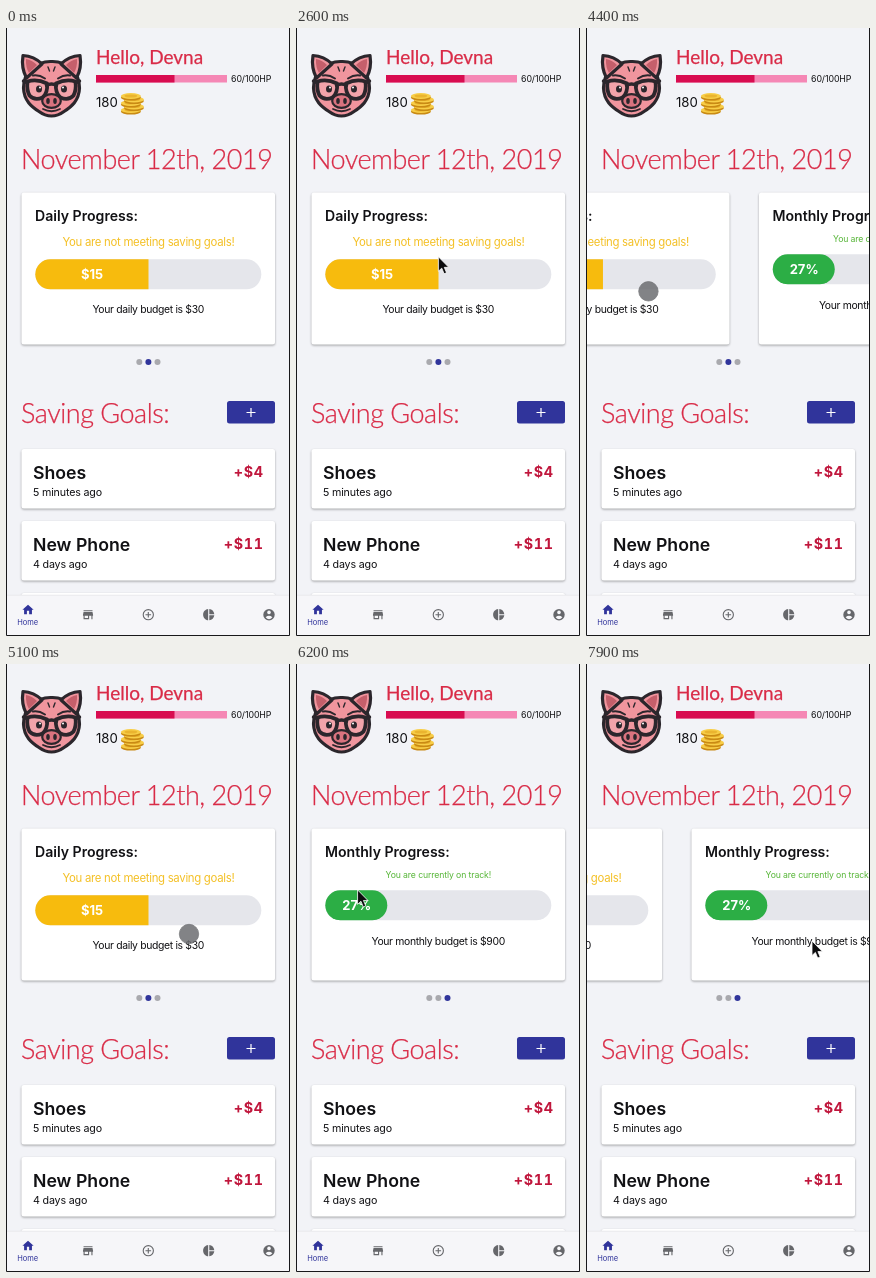
Write an HTML page that moves like this. It is 284 px wide and 608 px high and loops after 8000 ms.

```html
<!DOCTYPE html>
<html lang="en">
<head>
<meta charset="utf-8">
<title>Savings dashboard</title>
<style>
  html, body { margin: 0; width: 100%; height: 100%; overflow: hidden; background: #f2f3f7; }
  svg { display: block; width: 100%; height: 100%; }
  text { font-family: Inter, Roboto, sans-serif; fill: #111114; white-space: pre; }
  .lato { font-family: Lato, sans-serif; fill: #d92b47; stroke: #d92b47; stroke-width: .25px; }
  .light { font-size: 27px; font-weight: 300; letter-spacing: -.47px; }
  .head { font-size: 14.1px; font-weight: 600; }
  .mid { text-anchor: middle; }
  .body { font-size: 10.4px; letter-spacing: -.34px; }
  .bar { font-size: 13px; font-weight: 700; fill: #fff; }
  .goal { font-size: 17.7px; font-weight: 600; }
  .ago { font-size: 10.7px; letter-spacing: -.17px; }
  .gain { font-size: 14.3px; font-weight: 700; letter-spacing: .7px; text-anchor: end; fill: #c0163c; font-feature-settings: "tnum"; }
  .card { fill: #fff; filter: drop-shadow(0 1px 1px rgba(0, 0, 0, .34)); }
  .ink { fill: none; stroke: #2b262c; stroke-linecap: round; stroke-linejoin: round; }
  .dark { fill: #2b262c; }
  .skin { fill: #f0959e; }
  .icon { fill: #66676b; }
</style>
</head>
<body>
<svg viewBox="0 0 284 608" preserveAspectRatio="none">
  <defs>
    <clipPath id="view"><rect x="1" y="155" width="282" height="170"/></clipPath>
    <g id="ear">
      <path class="ink skin" d="M17 27.5Q15 40 20.5 50L36 36Q28 28 17 27.5Z" stroke-width="3.2"/>
      <path d="M20 31Q19.5 39 23 45L31 37Q26 32 20 31Z" fill="#c55f6b"/>
    </g>
    <g id="half">
      <path class="ink" d="M21.5 53.5Q31 50.5 41 55.5Q42 65 36.5 69.5Q28.5 73 23.5 67.5Q20.5 62 21.5 53.5Z" style="fill:#f2a3aa" stroke-width="3.8"/>
      <path class="ink" d="M21.5 55L17.5 53" stroke-width="3.4"/>
      <ellipse class="dark" cx="33" cy="61" rx="3" ry="3.5"/>
      <circle cx="34" cy="59.6" r="1" fill="#fff"/>
      <path class="ink" d="M27 47.5Q33 46.5 39 50.5" stroke-width="2"/>
    </g>
  </defs>
  <rect width="284" height="608" fill="#f2f3f7"/>

  <g id="pig">
    <path class="ink skin" d="M45.5 33.5C30 33 17.5 44 17.5 60C18 73 26 79 33 83.5Q39 88 45.5 88T58 83.5C65 79 73 73 73.5 60C73.5 44 61 33 45.5 33.5Z" stroke-width="3.2"/>
    <use href="#ear"/><use href="#ear" transform="matrix(-1 0 0 1 91 0)"/>
    <path class="ink" d="M42 39L43.5 43M49 39L47.5 43" stroke-width="1.4"/>
    <use href="#half"/><use href="#half" transform="matrix(-1 0 0 1 91 0)"/>
    <path class="ink" d="M40.5 57.5Q45.5 54.5 50.5 57.5" stroke-width="3.4"/>
    <ellipse class="ink" cx="45.5" cy="73" rx="9.3" ry="6.8" style="fill:#d9737f" stroke-width="2.2"/>
    <ellipse class="dark" cx="42" cy="73" rx="1.8" ry="3"/>
    <ellipse class="dark" cx="49" cy="73" rx="1.8" ry="3"/>
    <path class="ink" d="M37 81Q45.5 85.5 54 81" stroke-width="1.8"/>
  </g>

  <text class="lato" x="90" y="36" font-size="19">Hello, Devna</text>
  <rect x="90" y="47" width="131" height="7.5" fill="#f587b5"/>
  <rect x="90" y="47" width="78.5" height="7.5" fill="#d80c50"/>
  <text x="225" y="54" font-size="8.8" letter-spacing="-.08">60/100HP</text>
  <text x="90" y="79" font-size="13.2">180</text>
  <g id="coins"></g>

  <text class="lato light" x="15" y="140.5">November 12th, 2019</text>

  <g clip-path="url(#view)"><g id="track">
    <g>
      <rect class="card" x="15.5" y="164.5" width="253.5" height="152" rx="2.5"/>
      <text class="head" x="29" y="193">Daily Progress:</text>
      <text class="mid" x="142.5" y="217.5" font-size="11.4" letter-spacing="-.3" style="fill:#f4c026">You are not meeting saving goals!</text>
      <rect x="29.3" y="231.3" width="226" height="30" rx="15" fill="#e5e6eb"/>
      <path d="M142.5 231.3H44.3a15 15 0 0 0 0 30H142.5Z" fill="#f7bb0d"/>
      <text class="bar mid" x="86" y="250.7">$15</text>
      <text class="body mid" x="142.2" y="285">Your daily budget is $30</text>
    </g>
    <g transform="translate(283)">
      <rect class="card" x="15.5" y="164.5" width="253.5" height="152" rx="2.5"/>
      <text class="head" x="29" y="193">Monthly Progress:</text>
      <text class="mid" x="142.3" y="213.5" font-size="8.7" letter-spacing="-.12" style="fill:#55b536">You are currently on track!</text>
      <rect x="29.3" y="226.3" width="226" height="30" rx="15" fill="#e5e6eb"/>
      <rect x="29.3" y="226.3" width="62" height="30" rx="15" fill="#2cae45"/>
      <text class="bar mid" x="60.7" y="245.7">27%</text>
      <text class="body mid" x="142.2" y="280.5">Your monthly budget is $900</text>
    </g>
  </g></g>
  <g id="dots"></g>

  <text class="lato light" x="15" y="394.5">Saving Goals:</text>
  <rect x="221" y="373" width="48" height="22.5" rx="2.5" fill="#30349b"/>
  <path d="M240.5 384.5h9M245 380v9" stroke="#fff" stroke-width="1.2"/>
  <g id="goals"></g>

  <rect y="567" width="284" height="41" fill="#f6f6f9"/>
  <path d="M0 567.2H284" stroke="#e6e6ea" stroke-width=".8"/>
  <g transform="translate(15.3 575) scale(.56)"><path d="M10 20v-6h4v6h5v-8h3L12 3 2 12h3v8z" fill="#30349b"/></g>
  <text class="mid" x="21.7" y="597" font-size="7.5" style="fill:#30349b">Home</text>
  <g class="icon" transform="translate(75.3 580) scale(.56)"><path d="M20 4H4v2h16V4zm1 10v-2l-1-5H4l-1 5v2h1v6h10v-6h4v6h2v-6h1zm-9 4H6v-4h6v4z"/></g>
  <g fill="none" stroke="#66676b" stroke-width="1.1">
    <circle cx="142.3" cy="586.7" r="5.1"/><path d="M139.5 586.7h5.6M142.3 583.9v5.6"/>
  </g>
  <g class="icon" transform="translate(196 580) scale(.56)"><path d="M11 2v20c-5.07-.5-9-4.79-9-10s3.93-9.5 9-10zm2.03 0v8.99H22c-.47-4.74-4.24-8.52-8.97-8.99zm0 11.01V22c4.74-.47 8.5-4.25 8.97-8.99h-8.97z"/></g>
  <circle class="icon" cx="263" cy="586.7" r="5.7"/>
  <circle cx="263" cy="584.4" r="1.8" fill="#f7f7fa"/>
  <path d="M259.6 589.3Q263 586.4 266.4 589.3Q263 593 259.6 589.3Z" fill="#f7f7fa"/>

  <circle id="touch" r="9.7" fill="#6d6e72" stroke="#66676a" stroke-width=".8" opacity=".85"/>
  <path id="arrow" d="M0 0V14.5L3.4 11.4L5.7 17L8.2 16L5.9 10.6H10.4Z" fill="#0b0b0d" stroke="#fff" stroke-width=".8"/>
  <path d="M.5 0V607.5H283.5V0" fill="none" stroke="#18181b"/>
</svg>
<script>
const $ = id => document.getElementById(id);

$("coins").innerHTML = Array.from({ length: 5 }, (_, i) => {
  const x = 126.3 + (i % 2 ? 1.6 : -1.4), y = 82 - i * 3.5;
  return `<ellipse cx="${x}" cy="${y + 1.4}" rx="10" ry="3.2" fill="#c98a14"/>
    <ellipse cx="${x}" cy="${y}" rx="10" ry="3" fill="#f8ce48"/>
    <ellipse cx="${x}" cy="${y}" rx="6.5" ry="1.6" fill="#eab42f"/>`;
}).join("");

$("dots").innerHTML = [133.3, 142.4, 151.5].map(x => `<circle cx="${x}" cy="334" r="3"/>`).join("");
const dots = [...$("dots").children];

const goals = [["Shoes", "5 minutes ago", "+$4"], ["New Phone", "4 days ago", "+$11"], ["", "", ""]];
$("goals").innerHTML = goals.map(([name, ago, gain], i) => {
  const y = 421 + i * 72;
  return `<rect class="card" x="15.5" y="${y}" width="253.5" height="59.5" rx="2.5"/>
    <text class="goal" x="27" y="${y + 30}">${name}</text>
    <text class="ago" x="27" y="${y + 47}">${ago}</text>
    <text class="gain" x="257.7" y="${y + 28}">${gain}</text>`;
}).join("");

// Rows of [ms, value, ...]
const slide = [[3100, 0], [3450, -105], [3800, 0], [4000, 0], [4450, -130], [5000, 0],
  [5100, 0], [5500, -262], [5600, -282.3], [5700, -283], [7700, -283], [7900, -193]];
const finger = [[3900, 191, 259], [5000, 184, 269], [5100, 183, 270], [5400, 183, 269]];
const hover = [[1000, 176, 362], [1500, 86.5, 231.5], [1800, 56, 224], [2000, 48, 238], [2400, 132, 208],
  [2700, 146, 236]];
const back = [[5900, 178, 236], [6300, 40, 224], [6700, 138, 200], [7000, 149.3, 190.5], [7300, 194, 312],
  [7600, 137, 279], [7700, 137, 279], [7900, 226, 277]];

function at(rows, t) {
  if (t <= rows[0][0]) return rows[0].slice(1);
  const i = rows.findIndex(r => r[0] > t);
  if (i < 0) return rows[rows.length - 1].slice(1);
  const [a, b] = [rows[i - 1], rows[i]];
  const k = (t - a[0]) / (b[0] - a[0]), e = k * k * (3 - 2 * k);
  return a.slice(1).map((v, n) => v + (b[n + 1] - v) * e);
}

function place(el, shown, x, y) {
  el.style.display = shown ? "" : "none";
  el.setAttribute("transform", `translate(${x} ${y})`);
}

const LOOP = 8000, STEP = 100;
function draw(now) {
  const t = Math.floor(now % LOOP / STEP) * STEP;
  const [dx] = at(slide, t);
  place($("track"), true, dx, 0);

  const [fx, fy] = at(finger, t);
  place($("touch"), t >= 3200 && t <= 5400, fx + dx, fy);

  const early = t >= 1000 && t < 3200;
  place($("arrow"), early || t >= 5900, ...at(early ? hover : back, t));

  const active = t >= 5400 ? 2 : 1;
  dots.forEach((d, i) => d.setAttribute("fill", i === active ? "#30349b" : "#a9a9ae"));
}

const start = performance.now();
function tick() {
  draw(performance.now() - start);
  requestAnimationFrame(tick);
}
tick();
</script>
</body>
</html>
```
